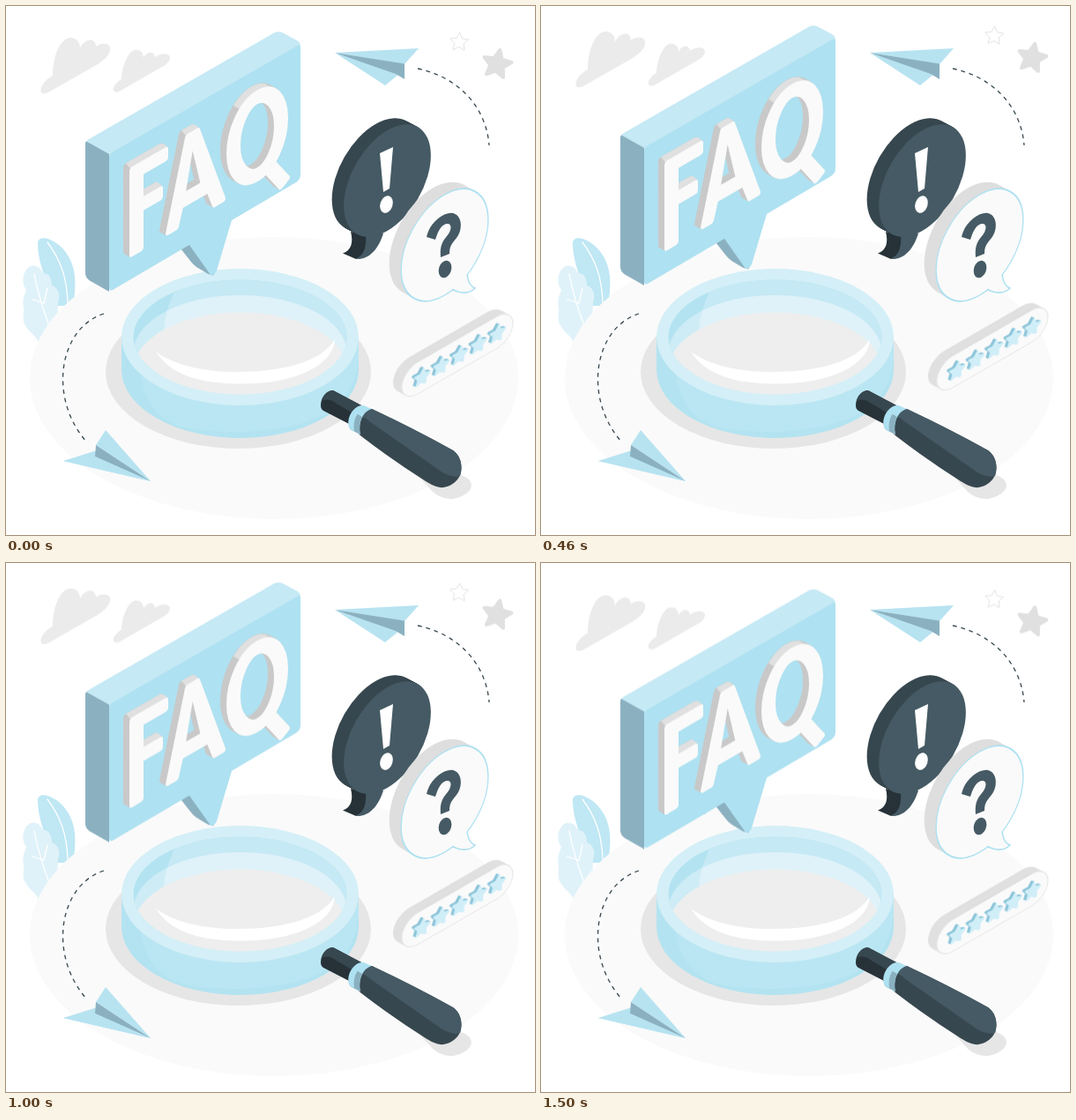
Write an HTML page that moves like this. It is 600x600 px and loops after 1540 ms.

```html
<!DOCTYPE html>
<html lang="en">
<head>
<meta charset="utf-8">
<title>FAQ</title>
<style>
html, body { margin: 0; width: 100%; height: 100%; overflow: hidden; background: #fff; }
svg { display: block; width: 100%; height: 100%; }
.main { fill: #aee1f1; }
.paper { fill: #b7e3f1; }
.shade { fill: #8bb1c1; }
.slate { fill: #455a64; }
.deep { fill: #37474f; }
.ink { fill: #263238; }
.cloud { fill: #ebebeb; }
.trail { fill: none; stroke: #37474f; stroke-width: 1.3; stroke-dasharray: 4.8; }
.vein { fill: none; stroke: #fff; stroke-width: 1.3; stroke-linecap: round; }
</style>
</head>
<body>
<svg viewBox="0 0 600 600">
<defs>
  <clipPath id="hole"><ellipse cx="265.5" cy="375.5" rx="121" ry="65"/></clipPath>
  <clipPath id="right"><path d="M203 300C188 330 180 345 179 370L179 460H420V300Z"/></clipPath>
  <circle id="disc" r="57" transform="matrix(.866 -.5 0 1 0 0)"/>
  <clipPath id="face"><use href="#disc" x="432.5" y="198"/></clipPath>
  <g id="word" stroke-linejoin="round" stroke-width="6" fill-rule="evenodd">
    <path d="M143 187H181V197H153V228H175V238H153V283H143Z"/>
    <path d="M206 186H217L246 281H237L230.500 261H198.500L193 282H184ZM211.500 190L200.500 250H224Z"/>
    <ellipse cx="285" cy="231" rx="27" ry="44" fill="none" stroke-width="16"/>
    <path d="M294 274L302 271L319 299L312 304Z"/>
  </g>
</defs>

<!-- plant, cut by the floor -->
<path d="M36 269C36 263 43 262 50 265C66 272 76 288 78 306C79 318 78 328 76 340H58C48 318 36 292 36 269Z" fill="#bfe7f4"/>
<path class="vein" d="M47 268C62 288 69 308 70 336"/>
<path d="M28 295C35 293 39 297 42 303C49 303 52 309 52 317C60 320 62 328 59 336L58 370L38 384C35 374 27 371 23 364C17 356 21 349 20 342C18 334 21 328 23 322C16 312 20 299 28 295Z" fill="#e0f2f9"/>
<path class="vein" d="M32 304C36 325 44 350 51 368M30 333L43 337L47 320"/>
<ellipse cx="304" cy="422" rx="277" ry="160" fill="#fafafa"/>

<!-- magnifier -->
<g fill="#e6e6e6">
  <ellipse cx="263.500" cy="415" rx="150.500" ry="87"/>
  <path d="M465 530L484 551Q500 564 517 556Q531 549 527 540Q524 533 508 530Z"/>
</g>
<path d="M131 375.500V412.500A134.500 77.500 0 0 0 400 412.500V375.500Z" fill="#b3e3f1"/>
<path d="M153 418C157 446 170 468 198 477C240 487 320 486 362 462C385 448 396 430 400 400V380H153Z" fill="#bae6f3"/>
<ellipse cx="265.500" cy="375.500" rx="134.500" ry="77.500" fill="#d4eff7"/>
<g clip-path="url(#hole)">
  <rect x="140" y="305" width="250" height="140" fill="#b3e3f1"/>
  <rect x="140" y="305" width="250" height="140" fill="#c5e9f5" clip-path="url(#right)"/>
  <ellipse cx="265.500" cy="393" rx="121" ry="65" fill="#cdecf6"/>
  <ellipse cx="265.500" cy="393" rx="121" ry="65" fill="#dff2f9" clip-path="url(#right)"/>
  <ellipse cx="265.500" cy="412.500" rx="121" ry="65" fill="#eeeeee"/>
</g>
<path d="M170 392C188 420 222 428 265 428.500C328 429 371 408 373 378C359 402 318 415 262 415C215 415 186 404 170 392Z" fill="#fff"/>
<path class="ink" d="M357 453C357 444 363 436 371 436L405 454L391 475L360 459Q357 457 357 453Z"/>
<path class="deep" d="M358 448C360 441 365 436 371 436L405 454L397 464L375 451Q366 444 358 448Z"/>
<path class="deep" d="M399 483C395 472 404 456 415 457Q464 480 507 504C517 511 518 524 515 532C511 542 498 549 488 545Q482 543 476 539Q438 515 403 488Q400 486 399 483Z"/>
<path class="slate" d="M403 466C406 460 410 457 415 457Q464 480 507 504C517 511 518 524 515 533C510 535 503 533 495 529L412 471Q407 466 403 466Z"/>
<path class="main" d="M391 468C394 458 399 453 405 453L415 457C406 459 399 471 402 486L392 481Z"/>
<path class="shade" d="M389 477C388 471 390 465 394 460L404 466C401 472 400 479 402 486L392 481Q390 480 389 477Z"/>
<path class="main" d="M389 477C386 467 394 453 405 453L410 455C399 458 393 468 395 482Q390 481 389 477Z"/>

<!-- planes -->
<g class="paper">
  <path d="M373 53L468 48L452 66Z"/>
  <path d="M373 53L446 77L430 90Z"/>
  <path class="shade" d="M373 53L452 65.500V83L442 77Z"/>
  <path d="M113 481L164 539L102 498Z"/>
  <path d="M65 516L103 504L164 539Z"/>
  <path class="shade" d="M102 498L164 539L101 511Z"/>
  <path d="M65 516L101 511L164 539Z"/>
</g>
<path class="trail" d="M467 71C510 80 544 111 548 158"/>
<path class="trail" d="M111 349C60 365 47 445 92 495"/>

<!-- round speech bubbles -->
<path class="ink" d="M391 256C394 268 392 277 382 280.500L397 287C406 283 411 275 411 260Z"/>
<g class="deep" id="darkSide"></g>
<path class="slate" d="M408 258C409 272 407 282 397 287C411 288 422 277 428 258Z"/>
<use class="slate" href="#disc" x="432.500" y="198"/>
<use class="deep" href="#disc" x="480" y="261" clip-path="url(#face)"/>
<g fill="#fff">
  <path d="M424 167L439 160L435 207L428 211Z"/>
  <ellipse cx="431.500" cy="225" rx="7" ry="10" transform="rotate(18 431.500 225)"/>
</g>
<g fill="#dedede" id="paleSide"></g>
<g fill="#fafafa" stroke="#aee1f1" stroke-width="1.600">
  <path d="M523 300C523 312 526 318 532 320C525 327 516 326 507 322Z"/>
  <use href="#disc" x="497.500" y="271"/>
  <path stroke="none" d="M522 300C522.300 312 525 317 530 320C525 325.500 516 325 508 321L500 315Z"/>
</g>
<path class="slate" d="M477 262C480 246 497 233 507 235C518 238 518 254 511 263C505 270 503 273 503 281L493 285C492 274 494 268 500 261C506 254 506 246 500 247C494 248 490 255 487 265Z"/>
<ellipse class="slate" cx="498" cy="298.500" rx="7" ry="10" transform="rotate(18 498 298.500)"/>

<g id="float">
  <path class="cloud" d="M41 99C36 95 44 83 53 79C53 60 60 37 73 36C81 36 84 42 84 48C88 38 101 34 102 46C110 40 120 43 118 50C117 57 110 62 104 66L48 98Q44 100 41 99Z"/>
  <path class="cloud" d="M123 97C119 94 125 86 131 83C131 72 137 52 146 50C153 49 156 54 156 59C159 52 168 50 169 58C176 53 186 53 186 59C185 64 181 67 177 69L130 96Q126 99 123 97Z"/>
  <g id="sky" stroke-linejoin="round"></g>

  <!-- board -->
  <path d="M90 157Q90 153 94 151L304 30.500Q309 28 314 30.500L330 39Q334 41 334 46L117 172Z" fill="#c5e9f5"/>
  <path class="shade" d="M90 157Q90 153 92 154L117 168V324L95 311.500Q90 308 90 303Z"/>
  <path class="shade" d="M198 275L210 269L236 305Q231 306 226 302L216 296Q212 293 209 289Z"/>
  <path class="main" d="M117 173Q117 168 121 165.500L329 46Q334 42 334 48V191Q334 197 329 200L256 243L239 300Q237 305 232 305L208 271L121 322Q117 324 117 319Z"/>
  <g transform="matrix(1 -.577 0 1 0 80.800)">
    <g id="depth" fill="#c9c9c9" stroke="#c9c9c9"></g>
    <g fill="#e0e0e0">
      <path d="M141 185L136 176H174Q179 177 183 185Z"/>
      <path d="M156 225H177L171 217H156Z"/>
      <path d="M204 184L199 175H210Q214 176 219 184Z"/>
      <path d="M265 189A35 52 0 0 1 300 184L293 176A35 52 0 0 0 258 181Z"/>
    </g>
    <use href="#word" fill="#fafafa" stroke="#fafafa"/>
  </g>

  <!-- rating -->
  <g id="rating" transform="matrix(1 -.577 0 1 0 259)" stroke-linejoin="round"></g>
</g>
</svg>
<script>
const $ = id => document.getElementById(id);

function add(parent, tag, attrs) {
  const el = document.createElementNS("http://www.w3.org/2000/svg", tag);
  for (const k in attrs) el.setAttribute(k, attrs[k]);
  parent.append(el);
}

// Stack copies of a shape from (x + dx, y + dy) back to (x, y).
function extrude(parent, href, x, y, dx, dy, steps) {
  for (let i = steps; i > 0; i--) {
    add(parent, "use", { href, x: x + dx * i / steps, y: y + dy * i / steps });
  }
}

function star(parent, x, y, r, inner, turn, attrs) {
  const pts = Array.from({ length: 10 }, (_, i) => {
    const a = (turn + i * 36 - 90) * Math.PI / 180;
    const d = i % 2 ? r * inner : r;
    return (x + d * Math.cos(a)).toFixed(2) + "," + (y + d * Math.sin(a)).toFixed(2);
  });
  add(parent, "polygon", { points: pts.join(" "), ...attrs });
}

extrude($("darkSide"), "#disc", 432.5, 198, -13.5, -7, 14);
extrude($("paleSide"), "#disc", 497.5, 271, -13.5, -7.5, 14);
extrude($("depth"), "#word", 0, 0, -7, -8, 10);

star($("sky"), 514, 41, 11, .5, 3, { fill: "#fff", stroke: "#e3e3e3", "stroke-width": 1 });
star($("sky"), 557, 66, 16.5, .47, 11, { fill: "#e0e0e0", stroke: "#e0e0e0", "stroke-width": 4 });

// Rating pill, in sheared coordinates.
const pill = (x, y, attrs) =>
  add($("rating"), "rect", { x, y, width: 126, height: 36, rx: 18, ry: 18, ...attrs });
for (let i = 10; i > 0; i--) pill(449 - i, 414.5 - i * 1.12, { fill: "#e0e0e0" });
pill(449, 414.5, { fill: "#fafafa", stroke: "#e6e6e6", "stroke-width": 1 });
for (let n = 0; n < 5; n++) {
  const x = 472 + n * 21.4;
  for (let i = 3; i >= 0; i--) {
    const c = i ? "#8fc6da" : "#d0eef8";
    star($("rating"), x - i, 434.5 - i, 9, .5, 10, { fill: c, stroke: c, "stroke-width": 2 });
  }
}

// Linear rise and fall, held at 24 steps per second.
const LOOP = 1540, PEAK = 735, END = 1500;
const lift = t => t < PEAK ? -11.4 * t / PEAK : -11.4 + 11.9 * (t - PEAK) / (END - PEAK);
const steps = Array.from({ length: 37 }, (_, n) => ({
  offset: Math.round(n * 100 / 24) * 10 / LOOP,
  transform: `translateY(${lift(n * 1000 / 24).toFixed(2)}px)`,
  easing: "step-end"
}));
steps.push({ ...steps[36], offset: 1 });
$("float").animate(steps, { duration: LOOP, iterations: Infinity });
</script>
</body>
</html>
```
